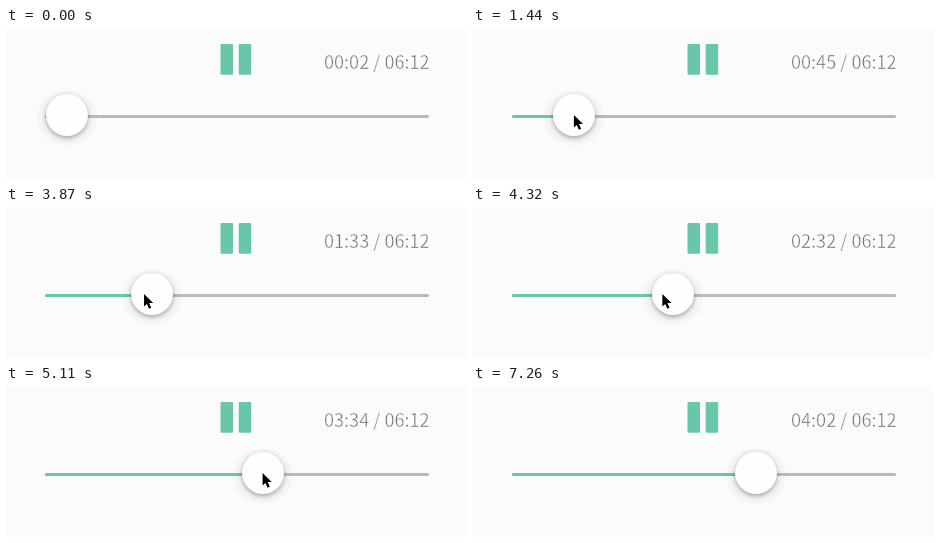
Animation of 461 by 151 pixels, one loop 8000 ms. Source, as an HTML page with a canvas:

```html
<!DOCTYPE html>
<html lang="en">
<head>
<meta charset="utf-8">
<title>Audio player slider</title>
<style>
  html, body { margin: 0; width: 100%; height: 100%; overflow: hidden; background: #fbfbfb; }
  canvas { display: block; }
</style>
</head>
<body>
<canvas id="stage" width="461" height="151"></canvas>
<script>
const ctx = document.getElementById('stage').getContext('2d');
const LOOP = 8000, STEP = 90, PHASE_SHIFT = 5100;
const TOTAL = 372, TICK = 990, STALL = 180;
const GREEN = '#6ac6ab', GREY = '#b9b9b9', BACK = '#fbfbfb';
const POINTER_Y = 87;

// Each drag moves playback to `to` seconds and the pointer to `x`.
const DRAGS = [
  { start: 1260, end: 1800, to: 92, x: 138, power: 1.6 },
  { start: 3870, end: 4590, to: 172.6, x: 207, power: 1.39 },
  { start: 4590, end: 5550, to: 240.46, x: 288, power: 1.25 }
];
const ENTER = { start: 540, end: 1170, from: { x: 78, y: 127 }, to: { x: 67, y: POINTER_Y } };
const LEAVE = { start: 5910, end: 6270, to: { x: 274, y: 132 } };

const mix = (a, b, k) => a + (b - a) * k;

function progress({ start, end }, t, power) {
  const u = Math.min(1, Math.max(0, (t - start) / (end - start)));
  return 1 - (1 - u) ** power;
}

// Playback continues after a short stall at the end of each seek.
function positionAt(t) {
  const playOn = (from, since, now) => from + Math.max(0, now - since - STALL) / TICK;
  let position = 2, since = -450;
  for (const drag of DRAGS) {
    if (t < drag.start) break;
    position = mix(playOn(position, since, drag.start), drag.to, progress(drag, t, drag.power));
    since = drag.end;
  }
  return playOn(position, since, t);
}

function pointerAt(t) {
  const enter = progress(ENTER, t, 1.5), leave = progress(LEAVE, t, 4);
  let x = mix(ENTER.from.x, ENTER.to.x, enter);
  for (const drag of DRAGS) x = mix(x, drag.x, progress(drag, t, drag.power));
  return {
    x: mix(x, LEAVE.to.x, leave),
    y: mix(mix(ENTER.from.y, ENTER.to.y, enter), LEAVE.to.y, leave)
  };
}

function snap(t) {
  const base = t < PHASE_SHIFT ? 0 : PHASE_SHIFT;
  return base + Math.floor((t - base) / STEP) * STEP;
}

function clock(s) {
  const two = n => String(n).padStart(2, '0');
  return two(Math.floor(s / 60)) + ':' + two(s % 60);
}

function bar(x, y, w, h, r, color) {
  ctx.fillStyle = color;
  ctx.beginPath();
  ctx.roundRect(x, y, w, h, r);
  ctx.fill();
}

function disc(x, y, rx, ry, color) {
  ctx.fillStyle = color;
  ctx.beginPath();
  ctx.ellipse(x, y, rx, ry, 0, 0, Math.PI * 2);
  ctx.fill();
}

// A thin outline in the background colour gives the text a light weight.
function lightText(text, x, y) {
  ctx.font = '300 18.1px "Noto Sans CJK JP", "Noto Sans CJK SC", sans-serif';
  ctx.textAlign = 'right';
  ctx.fillStyle = '#6c6c6c';
  ctx.fillText(text, x, y);
  ctx.strokeStyle = BACK;
  ctx.lineWidth = 0.5;
  ctx.strokeText(text, x, y);
}

function drawKnob(x) {
  ctx.save();
  ctx.shadowColor = 'rgba(0,0,0,0.34)';
  ctx.shadowBlur = 5;
  ctx.shadowOffsetY = 2;
  disc(x, 87, 21, 21, '#fefefe');
  ctx.restore();
}

function drawPointer({ x, y }) {
  ctx.save();
  ctx.translate(x, y);
  ctx.beginPath();
  [[0, 0], [0, 12.6], [2.9, 9.9], [5, 14.8], [7.2, 13.8], [5.1, 9.1], [9.2, 9.1]]
    .forEach(([px, py]) => ctx.lineTo(px, py));
  ctx.closePath();
  ctx.lineWidth = 2;
  ctx.lineJoin = 'round';
  ctx.strokeStyle = '#fff';
  ctx.stroke();
  ctx.fillStyle = '#000';
  ctx.fill();
  ctx.restore();
}

function draw(time) {
  const t = snap(time);
  const position = positionAt(t);
  const knobX = Math.floor(59.5 + position * 0.924);

  ctx.fillStyle = BACK;
  ctx.fillRect(0, 0, 461, 151);

  bar(214.5, 16, 12.5, 30.7, 1, GREEN);
  bar(232.7, 16, 12.5, 30.7, 1, GREEN);
  lightText(clock(Math.floor(position)) + ' / ' + clock(TOTAL), 423.6, 41);

  disc(knobX, 90, 30, 27.5, '#f5f5f5');
  bar(39, 87, 384, 3, 1.5, GREY);
  bar(39, 87, knobX - 39, 3, 1.5, GREEN);
  drawKnob(knobX);

  if (t >= ENTER.start && t < LEAVE.end) drawPointer(pointerAt(t));
}

const start = performance.now();
function frame() {
  draw((performance.now() - start) % LOOP);
  requestAnimationFrame(frame);
}
frame();
</script>
</body>
</html>
```
